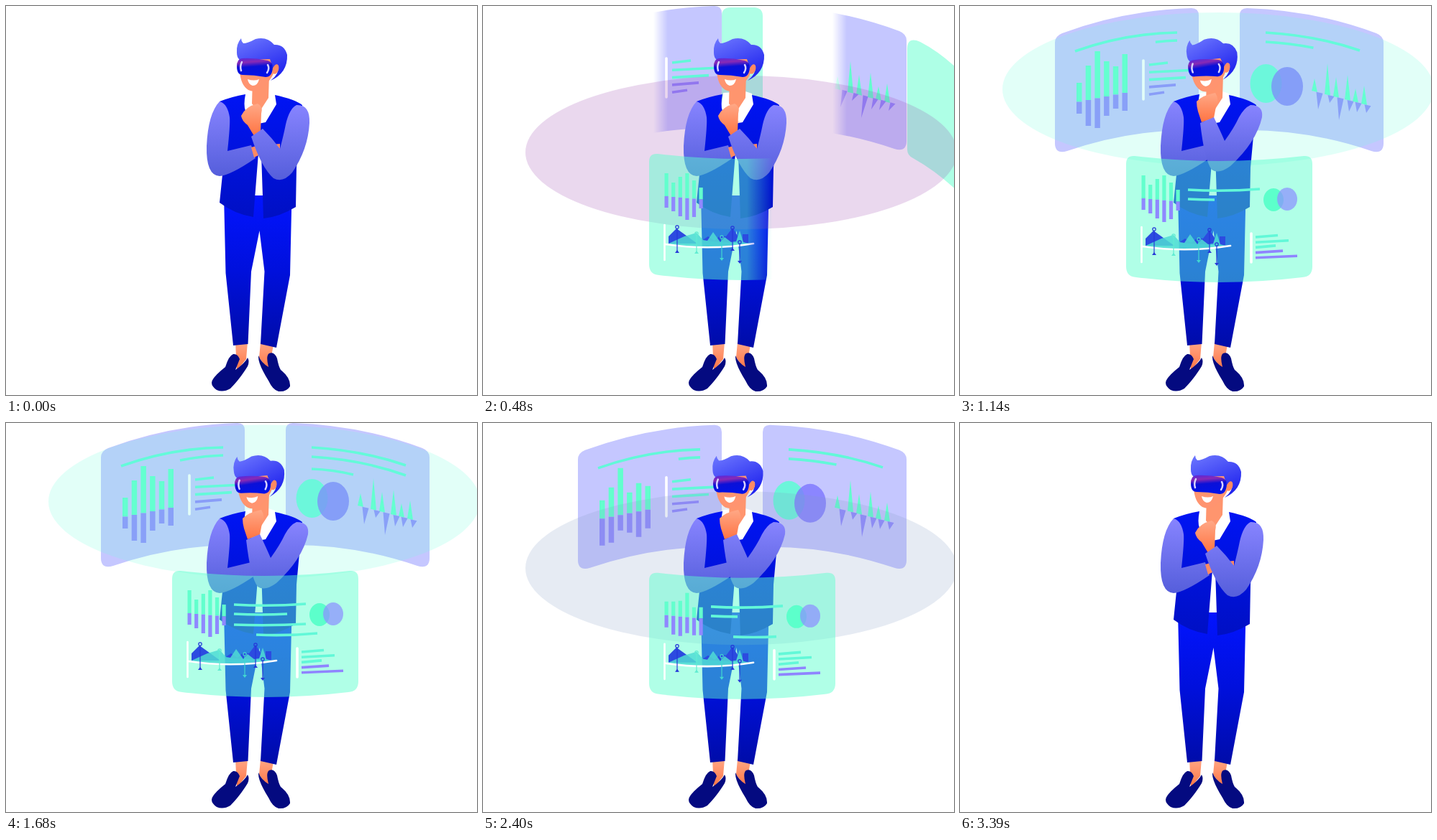
Animation, 655 px wide and 542 px high, one loop 3.6 s. Source, as an HTML page:

```html
<!DOCTYPE html>
<html lang="en">
<head>
<meta charset="utf-8">
<style>
html, body { margin: 0; width: 100%; height: 100%; overflow: hidden; background: #fff; }
svg { display: block; width: 655px; height: 542px; }
.line { fill: none; stroke-width: 3.6; }
.mint { stroke: #62f8d8; }
.violet { stroke: #8f84ff; }
.white { stroke: #fff; stroke-linecap: round; }
.thin { stroke-width: 1.2; }
</style>
</head>
<body>
<svg viewBox="0 0 655 542">
  <defs>
    <linearGradient id="hair" x2=".5" y2="1"><stop stop-color="#6e78ff"/><stop offset="1" stop-color="#2226ee"/></linearGradient>
    <linearGradient id="visor" x2=".15" y2="1"><stop stop-color="#5428dd"/><stop offset=".25" stop-color="#8a2ab4"/><stop offset=".5" stop-color="#0a10d8"/><stop offset="1" stop-color="#0012e8"/></linearGradient>
    <linearGradient id="skin" x2="0" y2="1"><stop stop-color="#ffa886"/><stop offset="1" stop-color="#ff7443"/></linearGradient>
    <linearGradient id="vest" x2="0" y2="1"><stop stop-color="#0014f4"/><stop offset="1" stop-color="#0010c4"/></linearGradient>
    <linearGradient id="sleeve" x2="0" y2="1"><stop stop-color="#8784ff"/><stop offset="1" stop-color="#555edb"/></linearGradient>
    <linearGradient id="trousers" x2="0" y2="1"><stop stop-color="#0214ff"/><stop offset=".5" stop-color="#0010dc"/><stop offset="1" stop-color="#000ca8"/></linearGradient>
    <linearGradient id="wipeL" gradientUnits="userSpaceOnUse" x1="-10" x2="10"><stop/><stop offset="1" stop-color="#fff"/></linearGradient>
    <linearGradient id="wipeR" href="#wipeL"/>
    <linearGradient id="wipeF" gradientUnits="userSpaceOnUse" x1="-20" x2="16"><stop stop-color="#fff"/><stop offset="1"/></linearGradient>
  </defs>

  <g id="legs">
    <path fill="url(#skin)" d="M319 468H336L334 492L321 508ZM354 468L372 472L369 488L364 506L352 490Z"/>
    <path fill="#040a80" d="M286 525Q286 518 305 503Q310 487 316 485Q322 484 325 492L319 507Q332 498 336 490Q339 495 336 502Q325 520 312 533Q302 539 293 535Q286 530 286 525ZM351 487Q355 497 365 503Q361 487 366 484Q373 481 377 491Q379 502 382 507Q396 518 395 530Q390 538 379 537Q371 535 365 522Q350 498 351 487Z"/>
    <path fill="url(#trousers)" d="M303 264H397V285L395 375L376 476L354 471L359.500 370L352.500 313L341 370L336.500 471L316 473L305.500 372Z"/>
  </g>

  <g id="back">
    <g id="backFloat">
      <g id="sides" fill="#aeffe6">
        <path d="M332 14Q332 2 344 2H378Q389 3 389 14V150H332Z"/>
        <path d="M590 60Q590 42 608 50Q635 64 660 88V258Q630 230 598 212Q590 208 590 200Z"/>
      </g>
      <g mask="url(#maskL)">
        <path id="panelL" class="soft" fill="#c5c7ff" d="M132 48Q132 39 142 35Q228 3 322 0Q332 0 332 10V170Q240 168 149 199Q132 204 132 188Z"/>
        <path id="upL" fill="#62ffcd"/><path id="downL" fill="#8f88ff"/>
        <path class="line white" d="M255 73V127"/>
        <g id="notesL"></g>
        <g id="textL"></g>
      </g>
      <g mask="url(#maskR)">
        <use href="#panelL" transform="matrix(-1 0 0 1 721 0)"/>
        <ellipse cx="425.5" cy="105" rx="22" ry="27" fill="#6cf5da"/>
        <ellipse cx="455" cy="109" rx="22" ry="27" fill="#7d76ff" opacity=".8"/>
        <path id="upR" fill="#62ffcd"/><path id="downR" fill="#8f88ff"/>
        <g id="textR"></g>
      </g>
    </g>
    <ellipse id="disc" class="soft" cx="359" rx="300" ry="107" opacity=".2"/>
  </g>

  <g id="torso">
    <path fill="#fff" d="M349 190H358V264H345ZM334 121L331 145L361 164L377 140L374 122L365 119Z"/>
    <path fill="#ff956e" d="M343 100L366 95L365 128L352 148L342 136Z"/>
    <path fill="url(#vest)" d="M297 133Q315 126 333 123Q330 138 333 146L346 165L361 162L376 137L374 124Q402 130 412 138L404 225L403 280Q380 294 358 296L355 205H351L344 294Q318 290 297 274L301 235Z"/>
    <path fill="url(#sleeve)" d="M297 133Q281 150 279 195Q278 236 297 237Q312 236 347 212L341 194L308 202Q312 165 311 155Q308 136 297 133Z"/>
    <path fill="#ff8a62" d="M341 197L351 194V208L345 211ZM371 193L381 192V199Z"/>
    <g id="head">
      <path fill="#ff9470" d="M325 90Q326 110 337 117Q348 122 358 112Q368 104 373 92V72H326Z"/>
      <path fill="#fff" d="M336 102Q345 105 352 102Q350 111 343 111Q337 109 336 102Z"/>
      <path fill="url(#hair)" d="M327 45Q320 53 321 65Q321 72 325 75L367 74L371 86L379 83Q380 95 368 104Q392 93 391 68Q387 53 373 54Q363 42 347 46Q336 52 330 52Q327 49 327 45Z"/>
      <ellipse cx="375" cy="88" rx="4" ry="7" fill="#ff8a62" transform="rotate(18 375 88)"/>
      <path fill="url(#visor)" d="M328 73Q346 72 364 76Q371 78 371 86Q370 99 361 99Q345 96 329 96Q321 96 321 84Q321 74 328 73Z"/>
      <path fill="none" stroke="#d9d2ff" stroke-width="2.500" stroke-linecap="round" d="M328 78Q325 84 327 90M364 82Q367 87 363 93"/>
    </g>
    <path id="fist" fill="url(#skin)"/>
    <path id="arm" fill="url(#sleeve)"/>
  </g>

  <g id="front">
    <g id="frontFloat" mask="url(#maskF)">
      <path class="soft" fill="#5affcd" fill-opacity=".48" d="M231 217Q231 205 243 206Q360 220 478 206Q490 205 490 217V360Q490 374 476 375Q360 389 245 375Q231 374 231 360Z"/>
      <path id="upF" fill="#62ffcd"/><path id="downF" fill="#8f88ff"/>
      <ellipse cx="436" cy="267" rx="14" ry="16" fill="#5cffcb"/>
      <ellipse cx="455" cy="266" rx="14" ry="16" fill="#8c90ff" opacity=".72"/>
      <path fill="#2c4be0" d="M258 331V321L269 310L298 331ZM304 327L313 321L322 327L330 320L338 321L347 309L354 320V330ZM361 318H369V330H361Z"/>
      <path fill="#4fdcd4" opacity=".85" d="M258 331L280 321L297 316L306 326L312 327L320 315L330 329L336 322L345 329L352 328L357 313L362 329L369 331Q310 339 258 333Z"/>
      <path class="line white" style="stroke-width:2.600" d="M252.500 305V354M254 332Q315 341 376 331"/>
      <path class="line white" d="M405 314V354"/>
      <g id="pins"></g>
      <g id="notesF"></g>
      <g id="textF"></g>
    </g>
  </g>
</svg>
<script>
const $ = id => document.getElementById(id);
const clamp = v => Math.max(0, Math.min(1, v));
const lerp = (a, b, k) => a + (b - a) * k;
const ramp = (t, from, to) => clamp((t - from) / (to - from));
const smooth = (t, from, to) => { const u = ramp(t, from, to); return u * u * (3 - 2 * u); };

// Blend two paths with the same commands.
function morph(a, b, k) {
  const ends = b.match(/\d+/g);
  let i = 0;
  return a.replace(/\d+/g, n => lerp(+n, +ends[i++], k).toFixed(2));
}

const arms = [
  'M404 138Q423 137 422 163Q420 200 398 232Q385 247 372 240Q355 225 341 182L357 171Q370 184 381 199Q386 180 389 165Q394 143 404 138Z',
  'M404 138Q422 138 420 155Q412 190 376 223Q360 235 350 228Q340 215 334 163L353 155Q362 174 368 188Q381 170 388 155Q395 142 404 138Z'
];
const fists = [
  'M327 153Q333 140 350 136Q358 140 355 150L354 175L345 181L336 166Q328 160 327 153Z',
  'M329 133Q338 124 355 121Q361 130 356 140L353 156L336 162L331 147Q329 140 329 133Z'
];

const charts = [
  { id: 'L', x: 162, step: 12.7, width: 7.5, split: 130.500, slope: -2.5,
    tops: [[104, 80, 60, 74, 81, 64], [105, 87, 60, 94, 81, 85]],
    ends: [[147, 164, 167, 150, 140, 143], [168, 164, 147, 150, 156, 144]] },
  { id: 'F', x: 252.500, step: 9.6, width: 5.2, split: 265, slope: .9,
    tops: [[233, 246, 238, 233, 243, 253], [246, 246, 245, 234, 254, 254]],
    ends: [[281, 286, 293, 298, 294, 282], [282, 292, 294, 290, 293, 293]] }
];

function drawBars({ id, x, step, width, split, slope, tops, ends }, k) {
  let up = '', down = '';
  for (let i = 0; i < 6; i++) {
    const left = x + i * step, mid = split + i * slope;
    up += `M${left} ${mid}V${lerp(tops[0][i], tops[1][i], k)}h${width}V${mid}Z`;
    down += `M${left} ${mid}V${lerp(ends[0][i], ends[1][i], k)}h${width}V${mid}Z`;
  }
  $('up' + id).setAttribute('d', up);
  $('down' + id).setAttribute('d', down);
}

const peaks = [[493, 98], [511, 77], [523, 96], [539, 93], [550, 112], [562, 108]];
const dips = [[500, 141], [516, 132], [529, 156], [543, 144], [554, 145], [567, 146]];
const spikes = (points, shift, lean, half) => points.map(([x, tip]) => {
  const base = x + shift, y = 116 + (x - 493) * .26;
  return `M${base - half} ${y - 1}L${x + lean} ${tip}L${base + half} ${y + 1}Z`;
}).join('');
$('upR').setAttribute('d', spikes(peaks, 0, 0, 4));

const line = (d, cls) => `<path class="line ${cls}" pathLength="1" d="${d}"/>`;
$('textL').innerHTML = line('M160 60Q230 35 302 34', 'mint') + line('M302 45Q272 46 242 52', 'mint');
$('textR').innerHTML = line('M425 34Q495 38 556 59', 'mint') + line('M425 47Q495 51 556 73', 'mint') +
  line('M425 64Q455 65 483 72', 'mint');
$('textF').innerHTML = line('M317 253Q367 256 417 252', 'mint') + line('M317 266Q355 268 391 266', 'mint') +
  line('M317 281Q367 283 417 280', 'mint') + line('M348 295Q390 297 433 293', 'mint');

const notes = (x, y, gap, drop, lengths) => lengths.map((len, i) =>
  line(`M${x} ${y + i * gap}q${len / 2} ${-drop / 2} ${len} ${-drop}`, i < 3 ? 'mint' : 'violet')).join('');
$('notesL').innerHTML = notes(263, 79, 10.3, 3, [26, 61, 51, 37, 21]);
$('notesF').innerHTML = notes(411, 319, 7.2, 2.5, [31, 46, 28, 38, 58]);

$('pins').innerHTML = [[270, 308, 344, '#2638d8'], [297, 317, 345, '#62ecd2'], [332, 322, 352, '#42d8d0'],
  [347, 309, 341, '#2638d8'], [357, 329, 356, '#2638d8']].map(([x, y, end, color], i) => {
    const tip = i === 2 || i === 4 ? 4 : -4;
    return `<path class="line thin" stroke="${color}" d="M${x} ${y + 2}V${end}"/>
      <circle class="line thin" cx="${x}" cy="${y}" r="2.2" stroke="${color}"/>
      <path fill="${color}" d="M${x - 3} ${end - (tip > 0 ? 1 : 0)}h6l-3 ${tip}Z"/>`;
  }).join('');

for (const id of 'LRF')
  document.querySelector('defs').insertAdjacentHTML('beforeend',
    `<mask id="mask${id}" maskUnits="userSpaceOnUse" x="-60" y="-60" width="800" height="660">
      <rect x="-60" y="-60" width="800" height="660" fill="url(#wipe${id})"/></mask>`);
const slide = (id, x) => $('wipe' + id).setAttribute('gradientTransform', `translate(${x})`);
const groups = ['textL', 'textR', 'textF'].map(id => [...$(id).children]);

function render(t) {
  const pose = smooth(t, 480, 900) - smooth(t, 2800, 3390);
  const nod = smooth(t, 500, 1080) - smooth(t, 1400, 2240) + smooth(t, 2240, 2700) - smooth(t, 2750, 3240);
  $('arm').setAttribute('d', morph(...arms, pose));
  $('fist').setAttribute('d', morph(...fists, pose));
  $('head').setAttribute('transform', `rotate(${-5.5 * nod} 352 125)`);

  const bob = 3 * (smooth(t, 480, 1140) - smooth(t, 1140, 1680) + smooth(t, 1680, 2520));
  $('backFloat').setAttribute('transform', `translate(0 ${bob})`);
  $('frontFloat').setAttribute('transform', `translate(0 ${bob})`);

  const open = ramp(t, 220, 820);
  slide('L', 344 - 224 * open);
  slide('R', 593 - 224 * open);
  slide('F', 212 + 300 * ramp(t, 130, 730));
  $('sides').style.opacity = ramp(t, 220, 420) - ramp(t, 560, 780);

  for (const chart of charts) drawBars(chart, smooth(t, 1720, 2080));
  const tilt = 1 - smooth(t, 480, 960);
  $('downR').setAttribute('d', spikes(dips, 3 * tilt, -2 - tilt, 4.5 - tilt));
  for (const group of groups) group.forEach((el, i) => {
    const drawn = ramp(t, 870 + 180 * i, 1050 + 180 * i) - ramp(t, 1900 + 150 * i, 2070 + 150 * i) +
      ramp(t, 2220 + 120 * i, 2340 + 120 * i);
    el.style.display = drawn > .01 ? '' : 'none';
    el.style.strokeDasharray = `${drawn} 2`;
  });

  const disc = $('disc'), mint = smooth(t, 560, 1000) - smooth(t, 2180, 2620);
  const fall = Math.max(0, t - 2100);
  disc.setAttribute('cy', 105 + 1.01e-4 * (t - 1470) ** 2 + 1.1e-4 * fall * fall);
  disc.setAttribute('fill', `rgb(${lerp(148, 110, mint)},${lerp(62, 252, mint)},${lerp(170, 218, mint)})`);
  disc.style.opacity = .2 * ramp(t, 0, 240);

  const leave = smooth(t, 2520, 3240);
  const scale = 1 - .55 * leave;
  for (const id of ['back', 'front']) {
    $(id).setAttribute('transform', `translate(357 268) scale(${scale}) translate(-357 -268)`);
    $(id).style.opacity = t ? 1 - ramp(t, 2760, 3180) : 0;
    for (const el of $(id).querySelectorAll('.soft'))
      el.style.filter = leave > 0 ? `blur(${(id === 'back' ? 56 : 34) * leave}px)` : 'none';
  }
}

function tick() {
  const t = performance.now() % 3600;
  render(Math.min(3390, Math.floor(t / 30) * 30));
  requestAnimationFrame(tick);
}
tick();
</script>
</body>
</html>
```
